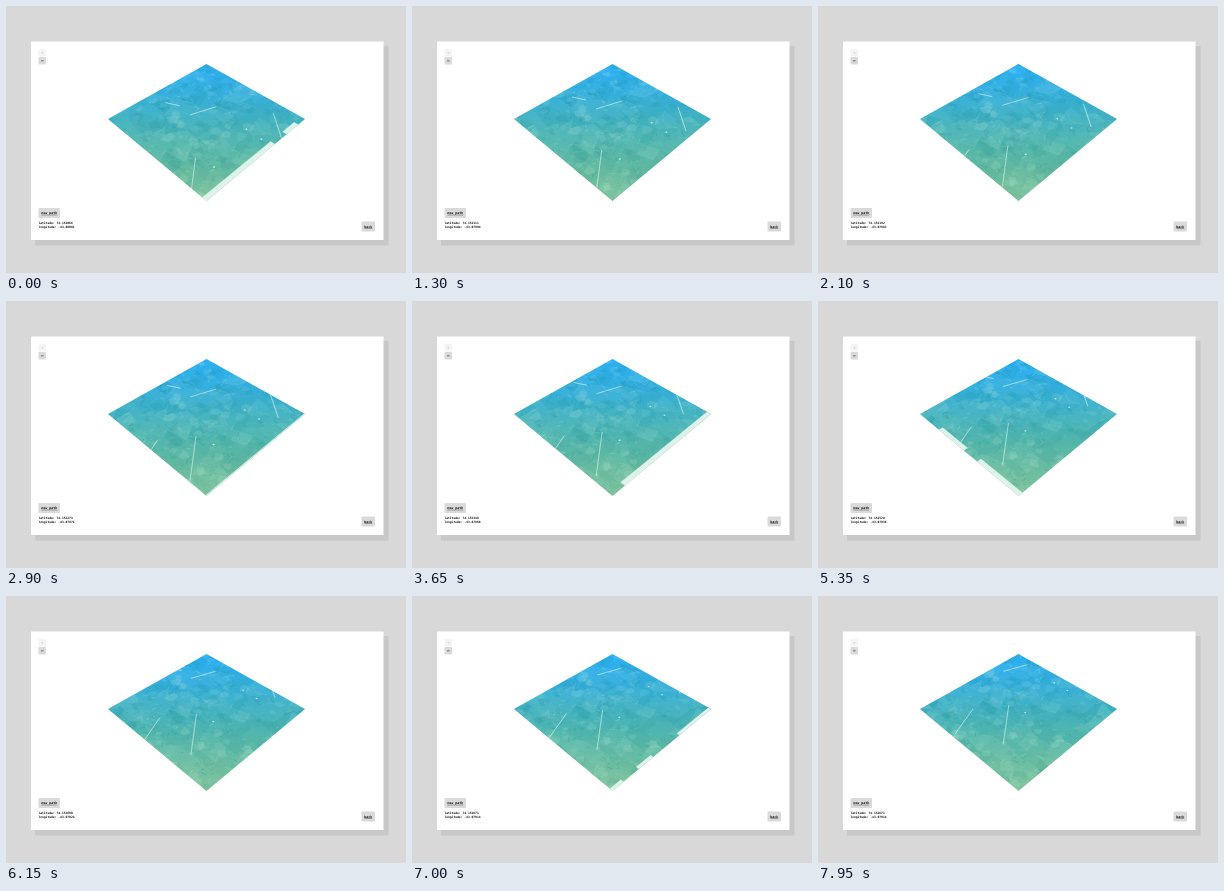
Write an HTML page with a canvas that moves like this. It is 400x267 px and loops after 8 s.

```html
<!DOCTYPE html>
<html lang="en">
<head>
<meta charset="utf-8">
<title>Drifting terrain</title>
<style>
html, body { margin: 0; width: 100%; height: 100%; overflow: hidden; background: #d8d8d8; }
canvas { display: block; width: 400px; height: 267px; }
</style>
</head>
<body>
<canvas id="stage"></canvas>
<script>
const W = 400, H = 267, LOOP = 8000, STEP = 50;
const SPEED = 0.0367;            // ground units per second along both axes
const canvas = document.getElementById('stage');
const ratio = window.devicePixelRatio || 1;
canvas.width = Math.round(W * ratio);
canvas.height = Math.round(H * ratio);
const ctx = canvas.getContext('2d');
ctx.scale(ratio, ratio);

let seed = 4711;
function rnd() {
  seed = (seed * 1664525 + 1013904223) >>> 0;
  return seed / 4294967296;
}
const range = (lo, hi) => lo + (hi - lo) * rnd();
const times = (n, make) => Array.from({ length: n }, (_, i) => make(i));

// Perspective of the unit ground square, mirrored about x = 200.5
const TILT = 0.1646, RISE = 36.4, SPREAD = 82.3, CX = 200.5, TOP = 58;
function project(u, v) {
  const a = u + v, w = 1 - TILT * a;
  return [CX + SPREAD * (u - v) / w, (TOP + RISE * a) / w];
}
// Ground point lying under a stage point at a given second
function ground(x, y, sec) {
  const a = (y - TOP) / (RISE + TILT * y);
  const b = (x - CX) * (1 - TILT * a) / SPREAD;
  return [(a + b) / 2 + SPEED * sec, (a - b) / 2 + SPEED * sec];
}

function shade(strength) {
  const tone = rnd() < 0.5 ? '225,248,225' : '15,125,135';
  return `rgba(${tone},${(strength * rnd()).toFixed(3)})`;
}

// Fields: a jittered mesh, then loose patches, then fine furrows
function makeMesh(n, count, strength) {
  const nodes = times(count + 1, i => times(count + 1, j =>
    [(i - 1 + range(-0.42, 0.42)) / n, (j - 1 + range(-0.42, 0.42)) / n]));
  return times(count * count, k => {
    const i = Math.floor(k / count), j = k % count;
    return {
      pts: [nodes[i][j], nodes[i + 1][j], nodes[i + 1][j + 1], nodes[i][j + 1]],
      fill: shade(strength)
    };
  });
}
function makePatch() {
  const u = range(-0.1, 1.4), v = range(-0.1, 1.4);
  const size = range(0.012, 0.055), turn = range(0, 6.28);
  const sides = 4 + Math.floor(rnd() * 3);
  const pts = times(sides, k => {
    const ang = turn + (k + range(-0.25, 0.25)) * 6.283 / sides;
    const r = size * range(0.65, 1.2);
    return [u + r * Math.cos(ang), v + r * Math.sin(ang)];
  });
  return { pts, fill: shade(0.14) };
}
function makeFurrow() {
  const u = range(-0.05, 1.38), v = range(-0.05, 1.38);
  const ang = range(0, 6.28), len = range(0.008, 0.05);
  return {
    pts: [[u, v], [u + len * Math.cos(ang), v + len * Math.sin(ang)]],
    stroke: shade(0.28), width: 0.4
  };
}
function makeRoad(sec, x1, y1, x2, y2) {
  return {
    pts: [ground(x1, y1, sec), ground(x2, y2, sec)],
    stroke: 'rgba(240,252,240,0.45)', width: 0.7
  };
}
function makeSpot(sec, x, y) {
  const [u, v] = ground(x, y, sec);
  const r = 0.006;
  return {
    pts: [[u - r, v - r], [u + r, v - r], [u + r, v + r], [u - r, v + r]],
    fill: 'rgba(240,255,248,0.75)'
  };
}
const shapes = [
  ...makeMesh(9, 15, 0.1),
  ...times(430, makePatch),
  ...times(600, makeFurrow),
  makeRoad(2.9, 184, 180, 190, 135),
  makeRoad(1.3, 266, 101, 274, 125),
  makeRoad(1.3, 160, 91, 174, 94),
  makeRoad(1.3, 184, 103, 210, 95),
  makeRoad(7.95, 137, 138, 155, 113),
  makeSpot(0, 208, 161),
  makeSpot(2.9, 253, 118),
  makeSpot(4.4, 238, 102)
];

// Map tiles enter at the two near edges and stay pale until loaded
const TILE = 0.135, U0 = 0.02, V0 = 0.085;
const quick = new Set(['7,1', '9,4', '9,5', '1,8', '2,8', '5,8']);
const CACHED_ROW = 7;
const tiles = times(121, k => {
  const i = k % 11, j = Math.floor(k / 11);
  const u = U0 + i * TILE, v = V0 + j * TILE;
  const enter = (Math.max(u, v) - 1) / SPEED;
  const fast = j === CACHED_ROW || quick.has(i + ',' + j);
  const load = enter + (fast ? 0.2 : range(1, 1.45));
  const pts = [[u, v], [u + TILE, v], [u + TILE, v + TILE], [u, v + TILE]];
  return { pts, enter, load };
});

const tint = ctx.createLinearGradient(0, 58, 0, 195);
['#2ab0f6', '#34afdf', '#42b2c2', '#54b7ac', '#68bb9f', '#7cc29b']
  .forEach((color, i, all) => tint.addColorStop(i / (all.length - 1), color));

function trace(pts, shift) {
  ctx.beginPath();
  for (const [u, v] of pts) ctx.lineTo(...project(u - shift, v - shift));
  ctx.closePath();
}
function box(x, y, w, h, color) {
  ctx.fillStyle = color;
  ctx.fillRect(x, y, w, h);
}
function label(text, x, y, size) {
  ctx.fillStyle = '#111';
  ctx.font = `bold ${size}px "DejaVu Sans Mono", monospace`;
  ctx.fillText(text, x, y);
}
function button(x, y, w, h, color) {
  ctx.fillStyle = color;
  ctx.beginPath();
  ctx.roundRect(x, y, w, h, 1);
  ctx.fill();
}
function linkButton(x, y, w, h, text) {
  button(x, y, w, h, '#dadada');
  const tx = x + 2.8, ty = y + 6.2;
  label(text, tx, ty, 3.3);
  box(tx, ty + 0.6, ctx.measureText(text).width, 0.4, '#333');
}

function drawGround(sec) {
  const shift = SPEED * sec;
  ctx.save();
  trace([[0, 0], [1, 0], [1, 1], [0, 1]], 0);
  ctx.clip();
  box(100, 56, 202, 142, tint);
  for (const { pts, fill, stroke, width } of shapes) {
    const [u, v] = pts[0];
    if (Math.min(u, v) < shift - 0.35 || Math.max(u, v) > shift + 1.2) continue;
    trace(pts, shift);
    if (fill) {
      ctx.fillStyle = fill;
      ctx.fill();
    } else {
      ctx.strokeStyle = stroke;
      ctx.lineWidth = width;
      ctx.stroke();
    }
  }
  ctx.fillStyle = ctx.strokeStyle = '#e0f3eb';
  ctx.lineWidth = 0.3;           // hides the seams between pale tiles
  for (const { pts, enter, load } of tiles) {
    if (sec < enter || sec >= load) continue;
    trace(pts, shift);
    ctx.fill();
    ctx.stroke();
  }
  ctx.restore();
}

function drawReadout(sec) {
  const k = Math.min(1, Math.max(0, (sec - 0.85) / 6));
  const lat = (74.152066 + 0.000605 * k).toFixed(6);
  const lon = (-43.08001 + 0.00087 * k).toFixed(5);
  label('latitude: ' + lat, 32.4, 218, 3);
  label('longitude: ' + lon, 32.4, 222, 3);
}

function draw(ms) {
  const sec = ms / 1000;
  box(0, 0, W, H, '#d8d8d8');
  box(29, 40, 353.5, 199.5, '#c8c8c8');
  box(25, 35.5, 352.5, 198.5, '#fff');
  drawGround(sec);
  button(32.5, 43, 7.5, 7.5, '#f4f4f4');
  box(35.2, 46.6, 2.2, 0.5, '#ccc');
  box(36.05, 45.75, 0.5, 2.2, '#ccc');
  button(32.5, 51, 7.5, 7.5, '#dadada');
  box(35, 54.6, 2.5, 0.6, '#222');
  linkButton(32.5, 202, 21.5, 10, 'new path');
  linkButton(355.5, 215.5, 13.5, 10, 'back');
  drawReadout(sec);
}

const start = performance.now();
function tick() {
  const ms = (performance.now() - start) % LOOP;
  draw(Math.floor(ms / STEP) * STEP);
  requestAnimationFrame(tick);
}
tick();
</script>
</body>
</html>
```
